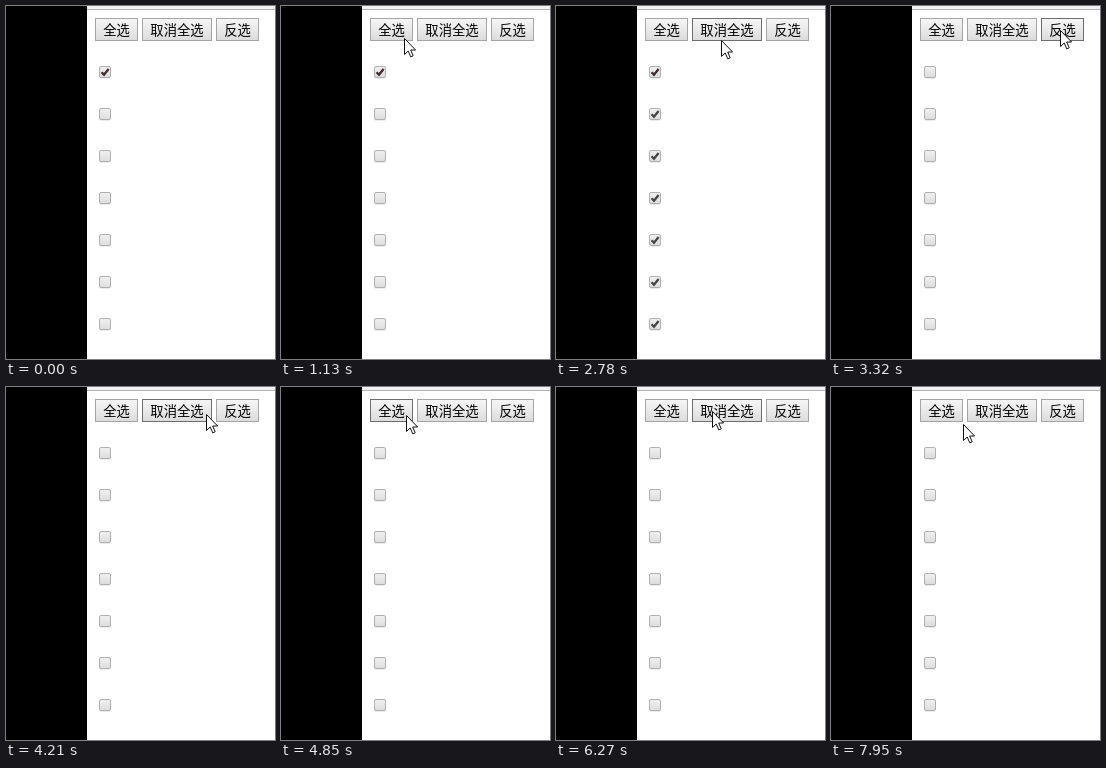
An HTML page that plays this animation: 269 by 353 pixels, repeating every 8000 ms.

```html
<!DOCTYPE html>
<html lang="zh-CN">
<head>
<meta charset="utf-8">
<title>全选 / 反选</title>
<style>
html, body { margin: 0; width: 100%; height: 100%; overflow: hidden; background: #fff; }
#stage { position: relative; width: 269px; height: 353px; overflow: hidden; background: #fff; }
#side { position: absolute; left: 0; top: 0; width: 81px; height: 353px; background: #000; }
#edge { position: absolute; left: 81px; top: 0; right: 0; height: 3px; background: #f1f1f3; border-bottom: 1px solid #b4b4b6; }
#rows { position: absolute; left: 0; top: 0; }

.btn {
  position: absolute; top: 12px; height: 23px; box-sizing: border-box;
  border: 1px solid #a5a5a5; background: linear-gradient(#f5f5f5, #ececec 40%, #dcdcdc);
  font: 13.333px/21px "Noto Sans CJK SC", "Noto Sans CJK", sans-serif;
  color: #000; text-align: center; white-space: nowrap;
}
#all { left: 89px; width: 43px; }
#none { left: 136px; width: 70px; }
#flip { left: 210px; width: 43px; }

#all, #none, #flip, #first, #rest, #cursor { animation: 8s step-end infinite; }
#all { animation-name: all; }
#none { animation-name: none-btn; }
#flip { animation-name: flip; }
#first { animation-name: first; }
#rest { animation-name: rest; }
#cursor { position: absolute; overflow: visible; animation-name: cursor; }

/* Hover darkens the border, pressing darkens the whole button. */
@keyframes all {
  0%, 31.375%, 74.05%, 100% { border-color: #a5a5a5; filter: none; }
  14.75%, 19.5%, 60.625%, 66.75% { border-color: #6e6e6e; filter: none; }
  18.625%, 65.125% { border-color: #6e6e6e; filter: brightness(.94); }
}
@keyframes none-btn {
  0%, 37.475%, 59.78%, 98.58%, 100% { border-color: #a5a5a5; filter: none; }
  31.375%, 52%, 74.05%, 78.375% { border-color: #6e6e6e; filter: none; }
  77.5% { border-color: #6e6e6e; filter: brightness(.94); }
}
@keyframes flip {
  0%, 51.125%, 100% { border-color: #a5a5a5; filter: none; }
  37.475%, 41.5% { border-color: #6e6e6e; filter: none; }
  39.875% { border-color: #6e6e6e; filter: brightness(.94); }
}

@keyframes first {
  0%, 66.75%, 100% { opacity: 1; }
  41.5%, 78.375% { opacity: 0; }
}
@keyframes rest {
  0%, 41.5%, 78.375%, 100% { opacity: 0; }
  19.5%, 66.75% { opacity: 1; }
}

/* The pointer advances in discrete steps, as a screen recording does. */
@keyframes cursor {
  0% { left: 300px; top: 89px; }
  10% { left: 221px; top: 89px; animation-timing-function: steps(2); }
  11.625% { left: 172px; top: 60px; animation-timing-function: steps(3); }
  14.125% { left: 123px; top: 32px; animation-timing-function: steps(3); }
  16.625% { left: 111px; top: 26px; }
  29.625% { left: 112px; top: 26px; animation-timing-function: steps(5); }
  33.875% { left: 165px; top: 34px; animation-timing-function: steps(5); }
  38.375% { left: 229px; top: 24px; }
  48.5% { left: 228px; top: 25px; animation-timing-function: steps(11); }
  58.125% { left: 150px; top: 31px; animation-timing-function: steps(3); }
  60.625% { left: 125px; top: 28px; animation-timing-function: steps(4); }
  63.875% { left: 112px; top: 26px; }
  71.5% { left: 114px; top: 26px; animation-timing-function: steps(5); }
  75.75% { left: 156px; top: 24px; }
  94.625% { left: 155px; top: 25px; animation-timing-function: steps(6); }
  99.375%, 100% { left: 132px; top: 37px; }
}
</style>
</head>
<body>
<div id="stage">
  <div id="side"></div>
  <div id="edge"></div>
  <div class="btn" id="all">全选</div>
  <div class="btn" id="none">取消全选</div>
  <div class="btn" id="flip">反选</div>

  <svg id="rows" width="269" height="353">
    <defs>
      <linearGradient id="fill" x1="0" y1="0" x2="0" y2="1">
        <stop offset="0" stop-color="#f0f0f0"/>
        <stop offset=".38" stop-color="#e9e9e9"/>
        <stop offset="1" stop-color="#dcdcdc"/>
      </linearGradient>
      <g id="box">
        <rect x="93.5" y="1.5" width="11" height="11" rx="1.5" fill="none" stroke="#000" stroke-opacity=".08"/>
        <rect x="93.5" y=".5" width="11" height="11" rx="1.5" fill="url(#fill)" stroke="#b0b0b0"/>
      </g>
      <path id="mark" d="M95.6 6.2L98 8.7L102.6 3.1" fill="none" stroke-width="2.3"/>
    </defs>
    <g id="boxes"></g>
    <use id="first" href="#mark" y="60" stroke="#3c2c2c"/>
    <g id="rest" stroke="#444"></g>
  </svg>

  <svg id="cursor" width="13" height="21">
    <path d="M.5 .5V16.5L4.2 13L6.8 18.9L9.2 17.8L6.7 12H11.6Z" fill="#fff" stroke="#111"/>
  </svg>
</div>
<script>
const uses = (id, from) => Array.from({ length: 7 - from },
  (_, i) => `<use href="#${id}" y="${60 + 42 * (i + from)}"/>`).join("");
document.getElementById("boxes").innerHTML = uses("box", 0);
document.getElementById("rest").innerHTML = uses("mark", 1);
</script>
</body>
</html>
```
